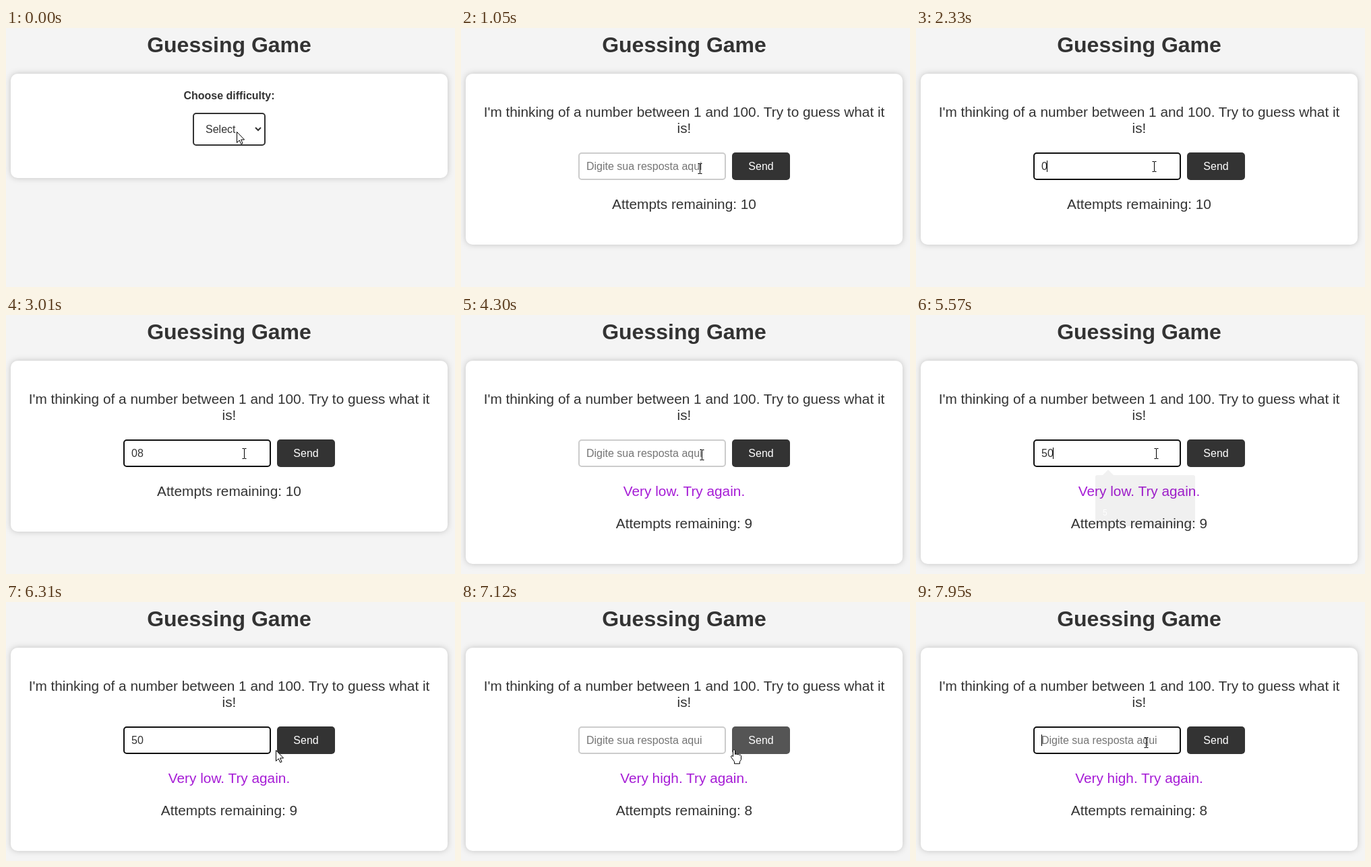
Animation of 666x385 px, one loop 8000 ms. Source, as an HTML page:

```html
<!DOCTYPE html>
<html lang="en">
<head>
<meta charset="utf-8">
<title>Guessing Game</title>
<style>
  html, body { margin: 0; height: 100%; overflow: hidden; background: #f4f4f4; }
  svg { display: block; width: 666px; height: 385px; }
  text { font-family: "Liberation Sans", Arial, sans-serif; white-space: pre; }
  .card { filter: drop-shadow(0 0 5px rgba(0, 0, 0, .2)); }
  .menu { filter: drop-shadow(0 2px 3px rgba(0, 0, 0, .25)); }
</style>
</head>
<body>
<svg id="stage" viewBox="0 0 666 385"></svg>
<script>
const LOOP = 8000, BLINK = 530, CENTER = 331, INK = '#333';
const GAME_START = 1050, MENU_OPEN = 290, MENU_CLOSE = 980;

// time, x, y of the pointer's hot spot
const pointerPath = [
  [0, 342, 154], [70, 342, 154], [90, 342, 148], [360, 342, 148], [710, 354, 209],
  [1050, 354, 209], [1200, 356, 210], [1500, 353, 206], [3130, 353, 206], [3350, 399, 206],
  [3550, 399, 206], [3690, 416, 212], [3880, 416, 212], [4300, 357, 208], [4560, 357, 208],
  [4570, 356, 206], [5990, 356, 206], [6310, 400, 220], [6400, 400, 220], [6440, 412, 220],
  [7020, 412, 220], [7400, 385, 215], [7810, 341, 209], [LOOP, 341, 209]
];

// time, value, focused
const inputStates = [
  [0, '', false], [1580, '', true], [2330, '0', true], [2480, '08', true],
  [3760, '08', false], [3830, '', false], [4570, '', true], [5300, '5', true],
  [5440, '50', true], [6590, '50', false], [6660, '', false], [7880, '', true]
];

// time, attempts left, message
const rounds = [
  [0, 10, ''], [3830, 9, 'Very low. Try again.'], [6660, 8, 'Very high. Try again.']
];

// time, digit, popup left edge
const popups = [[2330, '0'], [5300, '5']];

const latest = (states, t) => states.filter(s => s[0] <= t).pop();
const ramp = (t, a, b) => Math.min(1, Math.max(0, (t - a) / (b - a)));

function pointerAt(t) {
  const i = Math.max(1, pointerPath.findIndex(p => p[0] > t));
  const [a, ax, ay] = pointerPath[i - 1], [b, bx, by] = pointerPath[i];
  const k = ramp(t, a, b);
  return [Math.round(ax + (bx - ax) * k), Math.round(ay + (by - ay) * k)];
}

const text = (x, y, size, content, fill = INK, extra = '') =>
  `<text x="${x}" y="${y}" font-size="${size}" fill="${fill}" ${extra}>${content}</text>`;
const centered = (y, size, content, fill, extra = '') =>
  text(CENTER, y, size, content, fill, 'text-anchor="middle" ' + extra);
const rect = (x, y, w, h, r, fill, extra = '') =>
  `<rect x="${x}" y="${y}" width="${w}" height="${h}" rx="${r}" fill="${fill}" ${extra}/>`;
const frame = (x, y, w, h, color) =>
  rect(x + 1, y + 1, w - 2, h - 2, 4, '#fff', `stroke="${color}" stroke-width="2"`);
const card = bottom => rect(7, 68, 648, bottom - 68, 10, '#fff', 'class="card"');

function menu(y) {
  const hovered = y < 176 ? 0 : Math.min(3, Math.floor((y - 176) / 27));
  const rows = ['Select', 'Easy', 'Medium', 'Hard'].map((name, i) => {
    const top = 176 + 27 * i, on = i === hovered;
    return rect(278, top, 106, 27, 0, on ? '#1967d2' : '#fff') +
      text(296, top + 19, 16, name, on ? '#fff' : INK);
  });
  return `<g class="menu">${rect(277.5, 175.5, 107, 109, 0, '#fff', 'stroke="#767676"')}${rows.join('')}</g>`;
}

function chooser(t, y) {
  const open = t >= MENU_OPEN && t < MENU_CLOSE;
  return card(223) +
    centered(106, 16, 'Choose difficulty:', INK, 'font-weight="bold"') +
    frame(277, 126, 108, 49, INK) +
    text(296, 156, 16, t < MENU_CLOSE ? 'Select' : 'Easy') +
    `<path d="M370 148l4 4 4-4" fill="none" stroke="${INK}" stroke-width="2"/>` +
    (open ? menu(y) : '');
}

function suggestion(t) {
  return popups.map(([start, digit]) => {
    const age = t - start;
    const alpha = .8 * ramp(age, 30, 120) * (1 - ramp(age, 170, 280));
    if (alpha <= 0) return '';
    return `<g opacity="${alpha.toFixed(3)}">
      <path d="M266 241q0-3 3-3h8l8-8 8 8h118q3 0 3 3v70q0 3-3 3H269q-3 0-3-3z" fill="#2b2b2b"/>
      ${text(277, 298, 12, digit, '#fff')}</g>`;
  }).join('');
}

function game(t, hover) {
  const [since, value, focused] = latest(inputStates, t);
  const [, attempts, message] = latest(rounds, t);
  const caretOn = focused && Math.floor((t - since) / BLINK) % 2 === 0;
  const caretX = 186 + Math.floor(8.9 * value.length);
  return card(message ? 370 : 322) +
    centered(132, 20.8, "I'm thinking of a number between 1 and 100. Try to guess what it") +
    centered(156, 20.8, 'is!') +
    frame(174, 185, 219, 41, focused ? '#101010' : '#ccc') +
    (value ? text(186, 211, 16, value) : text(186, 211, 16, 'Digite sua resposta aqui', '#757575')) +
    (caretOn ? rect(caretX, 197, 1, 17, 0, '#000') : '') +
    rect(402, 185, 86, 41, 5, hover ? '#555' : INK) +
    text(445, 211, 16, 'Send', '#fff', 'text-anchor="middle"') +
    centered(269, 20.8, message, '#a61cd6') +
    centered(message ? 317 : 269, 20.8, `Attempts remaining: ${attempts}`) +
    suggestion(t);
}

const pointers = {
  arrow: '<path d="M.5.5v16l3.7-3.6 2.6 5.6 2.3-1-2.5-5.5h5z" fill="#fff" stroke="#000"/>',
  beam: '<path d="M-3-7.5h2.5l.5.5.5-.5H3M0-7V7M-3 7.5h2.5L0 7l.5.5H3" fill="none" stroke="#000"/>',
  hand: `<path d="M-1.5 1.5q1.5-2 3 0v6q1.5-1.5 3 .3 1.5-1.3 3 .5 2-.8 3 1v6l-2 3v3h-8v-3
    l-5-7q0-2.5 2-1.5l1 1z" fill="#fff" stroke="#000"/>`
};

function render(t) {
  const [x, y] = pointerAt(t);
  const playing = t >= GAME_START;
  const inside = (left, right) => playing && x >= left && x < right && y >= 185 && y < 226;
  const hover = inside(402, 488);
  const kind = hover ? 'hand' : inside(174, 393) ? 'beam' : 'arrow';
  const shift = kind === 'beam' ? .5 : 0;
  stage.innerHTML =
    centered(36, 32, 'Guessing Game', INK, 'font-weight="bold"') +
    (playing ? game(t, hover) : chooser(t, y)) +
    `<g transform="translate(${x + shift} ${y})">${pointers[kind]}</g>`;
}

const stage = document.getElementById('stage');
const startTime = performance.now();
function tick() {
  render((performance.now() - startTime) % LOOP);
  requestAnimationFrame(tick);
}
tick();
</script>
</body>
</html>
```
